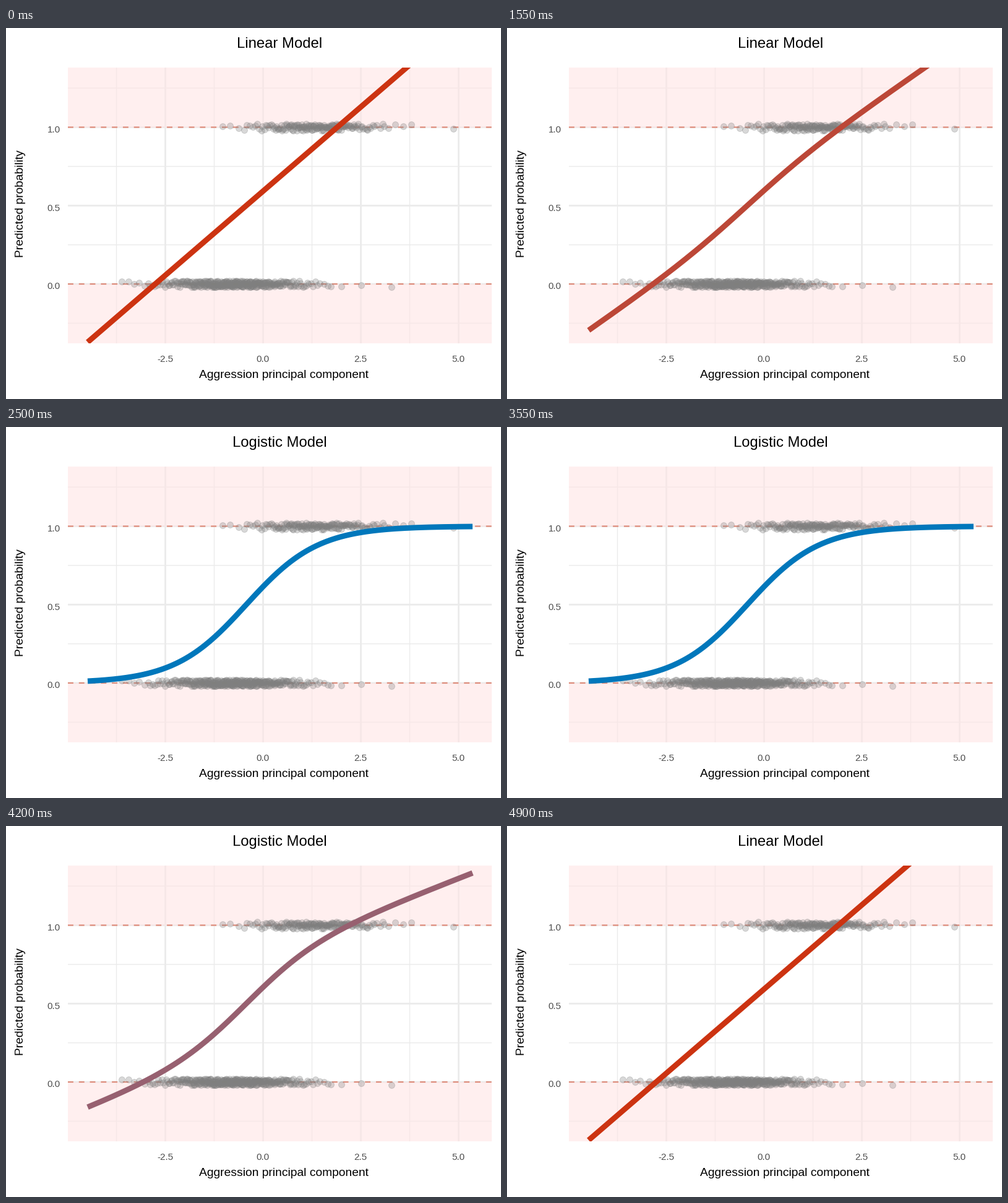
A matplotlib script that plays this animation: 800 by 600 pixels, repeating every 5 s.

```python
import numpy as np
import matplotlib.pyplot as plt
from matplotlib.animation import FuncAnimation
from matplotlib.colors import to_rgb
from matplotlib.patches import Rectangle

DPI = 100
PX = 72 / DPI                       # points per pixel
FRAMES, INTERVAL = 100, 50
LEFT, RIGHT, TOP, BOTTOM = 100, 785, 64, 510
RED, BLUE = "#CC3311", "#0077BB"

plt.rcParams["font.family"] = "Liberation Sans"
fig = plt.figure(figsize=(8, 6), dpi=DPI, facecolor="white")
ax = fig.add_axes([0, 0, 1, 1])
ax.set(xlim=(0, 800), ylim=(600, 0))
ax.axis("off")
panel = Rectangle((LEFT, TOP), RIGHT - LEFT, BOTTOM - TOP,
                  transform=ax.transData)


def sx(x):
    return 415.5 + 63.2 * x


def sy(p):
    return 414 - 253.5 * p


def label(x, y, text, size, color="black", **kw):
    return ax.text(x, y, text, fontsize=size * PX, color=color,
                   va="baseline", **{"ha": "center", **kw})


def stroke(xs, ys, width, color, z, **kw):
    line, = ax.plot(xs, ys, lw=width * PX, color=color, zorder=z,
                    solid_capstyle="butt", dash_capstyle="butt",
                    snap=False, **kw)
    line.set_clip_path(panel)
    return line


# Grid and tick labels
def grid(xs, ys, width):
    for x in xs:
        stroke([sx(x)] * 2, [TOP, BOTTOM], width, "#EBEBEB", 1)
    for y in ys:
        stroke([LEFT, RIGHT], [sy(y)] * 2, width, "#EBEBEB", 1)


x_ticks, y_ticks = np.arange(-2.5, 5.1, 2.5), np.arange(0, 1.1, 0.5)
grid(np.arange(-3.75, 4, 2.5), np.arange(-0.25, 1.3, 0.5), 1.4)
grid(x_ticks, y_ticks, 2.8)
for x in x_ticks:
    label(sx(x) - 0.4, 540, f"{x:.1f}", 15.3, "#4D4D4D")
for p in y_ticks:
    label(87.7, sy(p) + 8.4, f"{p:.1f}", 15.3, "#4D4D4D", ha="right")

# Impossible regions and their limits
for y0, y1 in ((TOP, sy(1)), (sy(0), BOTTOM)):
    ax.add_patch(Rectangle((LEFT, y0), RIGHT - LEFT, y1 - y0, lw=0,
                           fc="#FFE5E5", alpha=0.6, zorder=2))
for p in (0, 1):
    stroke([LEFT, RIGHT], [sy(p)] * 2, 2.223, RED, 3,
           alpha=0.5, ls=(0, (4, 4)))

# Observations: jittered normal samples, each with one outlier
rng = np.random.default_rng(14)


def cloud(p, n, mean, sd, outlier):
    u = (np.arange(n) + rng.uniform(0.1, 0.9, n)) / n
    z = 4.91 * (u ** 0.14 - (1 - u) ** 0.14)    # normal quantiles
    xs = np.append(mean + sd * z, outlier)
    ys = p + rng.uniform(-0.021, 0.021, n + 1)
    ax.scatter(sx(xs), sy(ys), s=(9.9 * PX) ** 2, lw=0.98 * PX,
               color="#7F7F7F", alpha=0.3, zorder=4)


cloud(1, 165, 1.35, 0.92, 4.87)
cloud(0, 330, -0.75, 1.03, 3.28)

# Titles
title = label(442.3, 32, "", 23.9)
label(448.5, 566, "Aggression principal component", 19.3)
label(28, 284.5, "Predicted probability", 19.3,
      rotation=90, rotation_mode="anchor")

# Colours blend in Lab space
XYZ = np.array([[0.4124, 0.3576, 0.1805],
                [0.2126, 0.7152, 0.0722],
                [0.0193, 0.1192, 0.9505]])
WHITE = XYZ.sum(axis=1)
LAB = np.array([[0, 116, 0], [500, -500, 0], [0, 200, -200]])


def to_lab(color):
    c = np.array(to_rgb(color))
    lin = np.where(c > 0.04045, ((c + 0.055) / 1.055) ** 2.4, c / 12.92)
    t = XYZ @ lin / WHITE
    return LAB @ np.where(t > 0.008856, np.cbrt(t), 7.787 * t + 16 / 116)


def from_lab(lab):
    f = np.linalg.solve(LAB, lab)
    t = np.where(f > 0.2069, f ** 3, (f - 16 / 116) / 7.787)
    lin = np.clip(np.linalg.solve(XYZ, t * WHITE), 0, 1)
    return np.clip(np.where(lin > 0.0031308,
                            1.055 * lin ** (1 / 2.4) - 0.055,
                            12.92 * lin), 0, 1)


# Fitted curves
xs = np.linspace(-4.486, 5.356, 240)
linear = 0.5926 + 0.2148 * xs
logistic = 1 / (1 + np.exp(-(0.468 + 1.087 * xs)))
red, blue = to_lab(RED), to_lab(BLUE)
curve = stroke(sx(xs), sy(linear), 8.9, RED, 5, solid_joinstyle="round")


def ease(u):
    return 4 * u ** 3 if u < 0.5 else 1 - 4 * (1 - u) ** 3


def progress(i):
    """Share of the way from the linear to the logistic fit."""
    if i <= 50:
        return max(0, (i - 20) / 30)
    return 1 - max(0, (i - 70) / 29)


def update(i):
    u = progress(i)
    t = ease(u)
    curve.set_ydata(sy(linear + (logistic - linear) * t))
    curve.set_color(from_lab(red + (blue - red) * t))
    title.set_text("Logistic Model" if u >= 0.5 else "Linear Model")
    return curve, title


anim = FuncAnimation(fig, update, frames=FRAMES, interval=INTERVAL,
                     init_func=lambda: update(0), repeat=True,
                     repeat_delay=0, blit=False)
plt.show()
```
